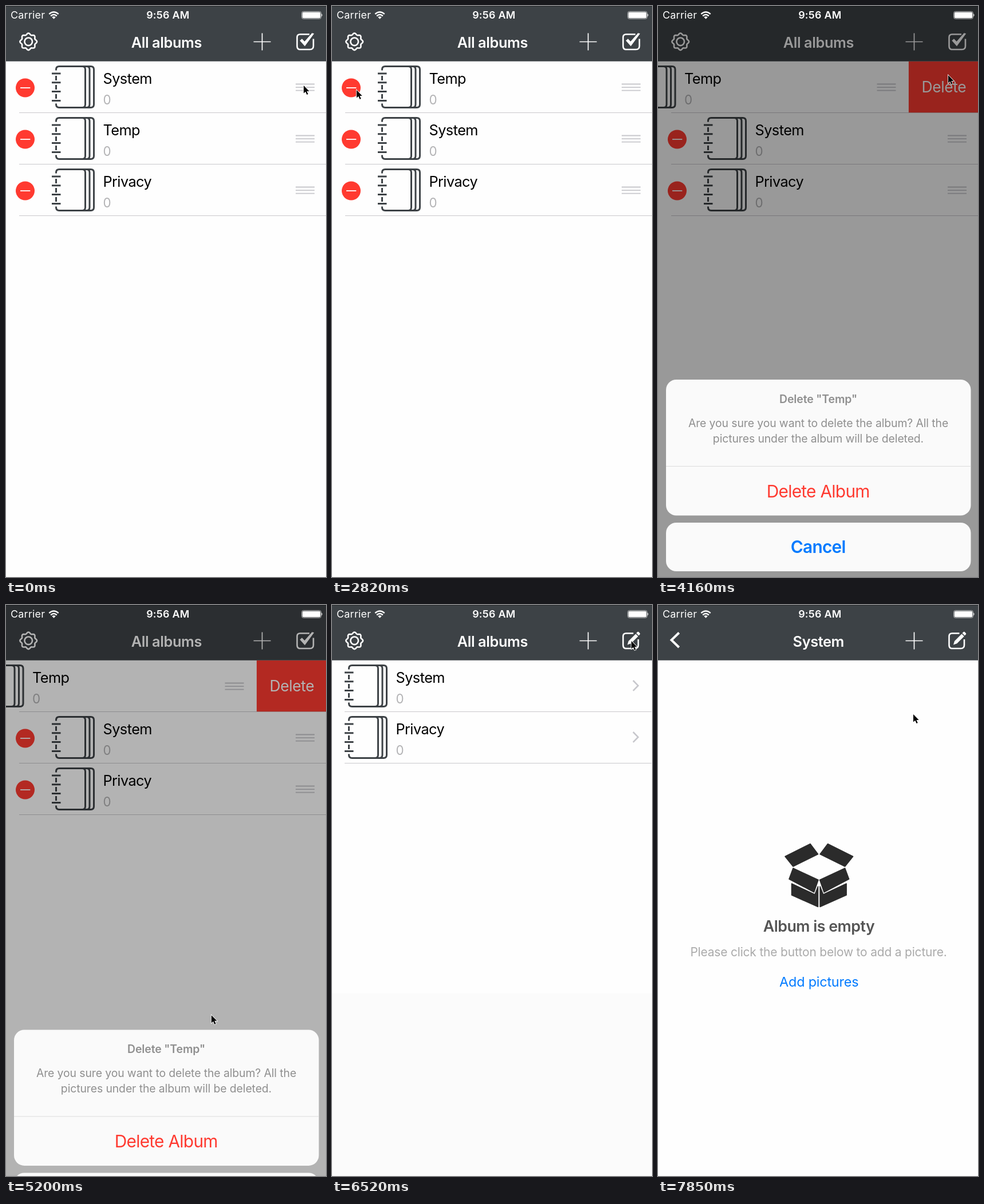
Write an HTML page that moves like this. It is 559 px wide and 998 px high and loops after 8 s.

```html
<!DOCTYPE html>
<html lang="en">
<head>
<meta charset="utf-8">
<title>Album list</title>
<style>
  html, body { margin: 0; width: 100%; height: 100%; overflow: hidden; background: #fefefe; }
  svg { display: block; width: 100%; height: 100%; }
  text { font-family: Inter, "Noto Sans", sans-serif; font-optical-sizing: none; white-space: pre; }
  .mid { text-anchor: middle; }
  .bold { font-weight: 600; }
  .line { fill: none; stroke: #fff; stroke-width: 2.6; }
  .name { font-size: 25.3px; letter-spacing: -.55px; }
  .count { font-size: 22.4px; fill: #b4b4b6; }
  .title { font-size: 25.3px; letter-spacing: -.38px; fill: #fff; }
  .status { font-size: 17.9px; letter-spacing: .25px; fill: #fff; }
  .note { font-size: 19.4px; letter-spacing: -.1px; fill: #8f8f8f; }
  .big { font-size: 29.8px; letter-spacing: -.7px; }
</style>
</head>
<body>
<svg viewBox="0 0 559 998" preserveAspectRatio="none">
  <defs>
    <linearGradient id="down" x2="0" y2="1">
      <stop stop-opacity=".6"/><stop offset=".35" stop-opacity=".22"/><stop offset="1" stop-opacity="0"/>
    </linearGradient>
    <linearGradient id="up" x2="0" y2="1">
      <stop stop-opacity="0"/><stop offset="1" stop-opacity=".28"/>
    </linearGradient>
    <linearGradient id="side">
      <stop stop-opacity="0"/><stop offset="1" stop-opacity=".2"/>
    </linearGradient>
    <g id="minus">
      <circle cx="33.5" cy="143" r="16.5" fill="#ff3a30"/>
      <path d="M25 143h17.3" stroke="#fff" stroke-width="1.8"/>
    </g>
    <path id="pageEdge" d="M133 105.5q5.5 0 5.5 5.5v61q0 5.5-5.5 5.5"/>
    <g id="book" fill="none" stroke="#3d4246" stroke-width="3">
      <path d="M87.5 112.5V111q0-5.5 5.5-5.5H148q5.5 0 5.5 5.5V172q0 5.5-5.5 5.5H93q-5.5 0-5.5-5.5V170.5"/>
      <use href="#pageEdge"/><use href="#pageEdge" x="7.5"/>
      <path d="M87.5 122v40" stroke-dasharray="8"/>
      <path d="M87.75 116.5v50.5" stroke-width="15.5" stroke-dasharray="3 12.8"/>
    </g>
    <path id="grip" d="M506 136.5h33m-33 5.6h33m-33 5.6h33" stroke="#c7c7cc" stroke-width="1.8"/>
    <path id="chevron" d="M526 132l8.7 8.9-8.7 8.9" fill="none" stroke="#c7c7cc" stroke-width="2.6"/>
    <path id="halfBox" d="M222 439.5l44-22 13.5 18-43.5 21.5zM236 460l44 20.5-7.5 21.5-43.5-23zM233.5 487l40.5 19 5.5-14v35.5l-46-20.5z"/>
  </defs>

  <rect width="559" height="998" fill="#fefefe"/>
  <rect id="footer" y="679" width="559" height="319" fill="#fbfbfb"/>

  <g id="list">
    <g id="rules" stroke="#c9c8cc">
      <path id="firstRule" d="M23 186.5h536"/>
      <path d="M23 276.5h536m-536 90h536"/>
    </g>
    <g id="rows"></g>
  </g>

  <g id="page">
    <rect x="-12" y="96" width="12" height="902" fill="url(#side)"/>
    <rect y="96" width="559" height="902" fill="#fefefe"/>
    <g fill="#2b2b2b" stroke="#2b2b2b" stroke-width="1.6" stroke-linejoin="round">
      <use href="#halfBox"/><use href="#halfBox" transform="matrix(-1 0 0 1 562.6 0)"/>
    </g>
    <text class="mid bold" x="281" y="570.5" font-size="26.8" letter-spacing="-.5" fill="#555">Album is empty</text>
    <text class="mid" x="280.5" y="614" font-size="20.9" letter-spacing="-.15" fill="#aaa">Please click the button below to add a picture.</text>
    <text class="mid" x="281.2" y="667" font-size="23.4" letter-spacing="-.2" fill="#007aff">Add pictures</text>
  </g>

  <rect width="559" height="96.7" fill="#3d4246"/>
  <rect width="559" height="1" fill="#272b2d"/>
  <path id="gear" class="line"/>
  <path id="back" class="line" style="stroke-width:4" d="M36.7 48.5L23.5 61.2 36.7 74"/>
  <text id="homeTitle" class="title bold mid" x="280.3" y="72.5">All albums</text>
  <text id="pageTitle" class="title bold mid" x="280.3" y="72.5">System</text>
  <g id="tools">
    <path class="line" style="stroke-width:1.7" d="M432.5 62.5h30m-15-15v30"/>
    <g id="doneIcon">
      <path class="line" d="M530 49.5H514q-5.5 0-5.5 5.5v15q0 6 5.5 6h17q6 0 6-6V57.5"/>
      <path fill="#fff" d="M513.3 60.5l3.7-3.2 4.6 4.7 13-14.7 3.6.9L522 70.2z"/>
    </g>
    <g id="editIcon">
      <path class="line" d="M526.5 49.5H514q-5.5 0-5.5 5.5v15q0 6 5.5 6h15q6 0 6-6V60"/>
      <path fill="#fff" d="M516 69.5l2-6.5 12.5-12.5 4.3 4.3-12.5 12.5zM531.5 49.3l2.2-2.2q1-.8 2 0l2.2 2.3q.8.9 0 1.9l-2.1 2.2z"/>
    </g>
  </g>

  <rect id="dim" width="559" height="998"/>

  <text class="status" x="8" y="22.3">Carrier</text>
  <text class="status bold mid" x="282.8" y="22.3">9:56 AM</text>
  <g fill="none" stroke="#fff" stroke-width="2.4">
    <path d="M75.3 14.2q8.2-7.6 16.4 0M78.2 17.5q5.3-4.8 10.6 0"/>
    <path fill="#fff" stroke="none" d="M83.5 22.8l-3.2-3.4q3.2-2.4 6.4 0z"/>
  </g>
  <rect x="516.5" y="9.5" width="34" height="13" rx="3" fill="none" stroke="#fff" stroke-opacity=".6"/>
  <rect x="517.7" y="10.7" width="31.6" height="10.6" rx="2" fill="#fff"/>
  <path d="M551.3 13.3q2.4 2.7 0 5.4z" fill="#fff"/>

  <g id="sheet">
    <rect x="14" y="653" width="532.5" height="237.5" rx="18" fill="#fafafa"/>
    <path d="M14 804.5h532.5" stroke="#dcdcdc"/>
    <text class="note mid bold" x="280" y="693.5">Delete "Temp"</text>
    <text class="note mid" x="280" y="736">Are you sure you want to delete the album? All the</text>
    <text class="note mid" x="280" y="763">pictures under the album will be deleted.</text>
    <text class="big mid" x="279.7" y="858.5" fill="#ff3a30">Delete Album</text>
    <rect x="14" y="903" width="532.5" height="85" rx="18" fill="#fafafa"/>
    <text class="big bold mid" x="279.7" y="956" fill="#007aff">Cancel</text>
  </g>

  <path id="cursor" d="M0 0v13.6l3.2-2.9 2.4 5.3 2.1-.9-2.3-5.2h4.3z" stroke="#fff" stroke-width="1.6" paint-order="stroke"/>
</svg>

<script>
const LOOP = 8000, STEPS = 54, PITCH = 90, WIDTH = 559;
const $ = id => document.getElementById(id);

const row = name => `<g id="${name}">
  <g class="shadow"><rect y="90.5" width="559" height="6.5" fill="url(#up)"/>
    <rect y="186" width="559" height="13" fill="url(#down)"/></g>
  <g class="cell">
    <rect class="fill" y="97" width="559" height="89" fill="#fefefe"/>
    <g class="body"><use href="#minus"/><use href="#book"/>
      <text class="name" x="169.5" y="136">${name}</text><text class="count" x="169.5" y="172">0</text></g>
    <use class="grip" href="#grip"/><use class="chevron" href="#chevron"/>
  </g></g>`;
$('rows').innerHTML = row('Temp') +
  `<svg id="trash" y="96.5" width="122"><rect width="122" height="100%" fill="#ff3a30"/>
    <text id="trashText" x="61.7" class="mid" font-size="26.4" letter-spacing="-.4" fill="#fff">Delete</text></svg>` +
  row('Privacy') + row('System');

// A circle with eight soft teeth around a plain ring.
let gear = '';
for (let i = 0; i < 96; i++) {
  const a = i * Math.PI / 48, r = 13.5 + 1.3 * Math.cos(8 * a);
  gear += `${i ? 'L' : 'M'}${39.2 + r * Math.cos(a)} ${62.3 + r * Math.sin(a)}`;
}
$('gear').setAttribute('d', gear + 'ZM46 62.3a6.8 6.8 0 1 0-13.6 0a6.8 6.8 0 1 0 13.6 0z');

// Smooth 0 to 1 between two steps.
function ramp(k, from, to) {
  const u = Math.min(1, Math.max(0, (k - from) / (to - from)));
  return u * u * (3 - 2 * u);
}

const home = { x: 519, y: 138 };
const moves = [
  { from: 2, to: 6, x: 519, y: 231 },      // drag System down
  { from: 7.5, to: 11.5, x: 519, y: 62 },
  { from: 14, to: 18, x: 42, y: 146 },     // minus button
  { from: 21, to: 25, x: 506, y: 120 },    // Delete
  { from: 29, to: 32, x: 330, y: 845 },    // Delete Album
  { from: 34, to: 38, x: 508, y: 19 },
  { from: 39, to: 41, x: 522, y: 62 },     // leave edit mode
  { from: 44, to: 46, x: 527, y: 119 },
  { from: 46, to: 48, x: 439, y: 138 },    // open System
  { from: 51, to: 53, x: 445, y: 190 }
];
const cursorAt = k => moves.reduce((p, m) => {
  const u = ramp(k, m.from, m.to);
  return { x: p.x + (m.x - p.x) * u, y: p.y + (m.y - p.y) * u };
}, home);

const move = (el, x, y = 0) => el.setAttribute('transform', `translate(${x} ${y})`);
const alpha = (el, v) => el.setAttribute('opacity', v);
const show = (el, on) => el.setAttribute('display', on ? 'inline' : 'none');

function placeRow(name, y, done, slide = 0, lift = 0) {
  const g = $(name), part = c => g.querySelector('.' + c);
  move(g, 0, y);
  move(part('body'), slide - 58 * done);
  move(part('grip'), slide);
  alpha(part('grip'), 1 - done);
  alpha(part('chevron'), done);
  alpha(part('cell'), 1 - .2 * lift);
  alpha(part('shadow'), lift);
}

function drawList(k, done, push) {
  const lift = ramp(k, 0, 1) - ramp(k, 7, 9);
  const drag = 93 * ramp(k, 2, 6) - 3 * ramp(k, 7, 8);
  const swipe = ramp(k, 19, 22);
  const collapse = PITCH * ramp(k, 38, 39.76);
  const height = PITCH - collapse;

  placeRow('Temp', PITCH * (1 - ramp(k, 3, 5)), 0, -123.5 * swipe);
  placeRow('System', drag - collapse, done, 0, lift);
  placeRow('Privacy', 2 * PITCH - collapse, done);
  show($('Temp'), collapse === 0);
  show($('firstRule'), collapse === 0);
  move($('rules'), -done, -collapse);
  $('System').querySelector('.fill').setAttribute('fill', push > 0 ? '#d8d8d8' : '#fefefe');

  $('trash').setAttribute('x', WIDTH - 121.3 * swipe);
  $('trash').setAttribute('height', height);
  $('trashText').setAttribute('y', height / 2 + 9.4);
  show($('trash'), swipe > 0 && height > 0);
  show($('footer'), k >= 37 && push === 0);
}

function drawPush(k, push) {
  const fade = ramp(k, 49.3, 52), arrive = ramp(k, 50, 52.5);
  const parallax = -.3 * WIDTH * push;
  move($('list'), parallax);
  move($('homeTitle'), parallax);
  move($('page'), WIDTH * (1 - push));
  move($('pageTitle'), 260 * (1 - push));
  show($('page'), push > 0);
  alpha($('homeTitle'), 1 - fade);
  alpha($('gear'), 1 - fade);
  alpha($('pageTitle'), arrive);
  alpha($('back'), arrive);
  alpha($('tools'), 1 - fade * (1 - fade));
}

function draw(k) {
  const done = ramp(k, 42, 44), push = ramp(k, 49.68, 52.5);
  const sheet = ramp(k, 26, 28) - ramp(k, 34, 37);
  const cursor = cursorAt(k);

  drawList(k, done, push);
  drawPush(k, push);
  show($('doneIcon'), done === 0);
  show($('editIcon'), done > 0);
  alpha($('dim'), .4 * sheet);
  move($('sheet'), 0, 345 * (1 - sheet));
  show($('sheet'), sheet > 0);
  move($('cursor'), cursor.x + 1, cursor.y + 1);
}

const start = performance.now();
let shown = -1;
function tick() {
  const t = (performance.now() - start) % LOOP;
  const k = Math.min(STEPS - 1, Math.floor((t + 8) * STEPS / LOOP));
  if (k !== shown) draw(shown = k);
  requestAnimationFrame(tick);
}
tick();
</script>
</body>
</html>
```
